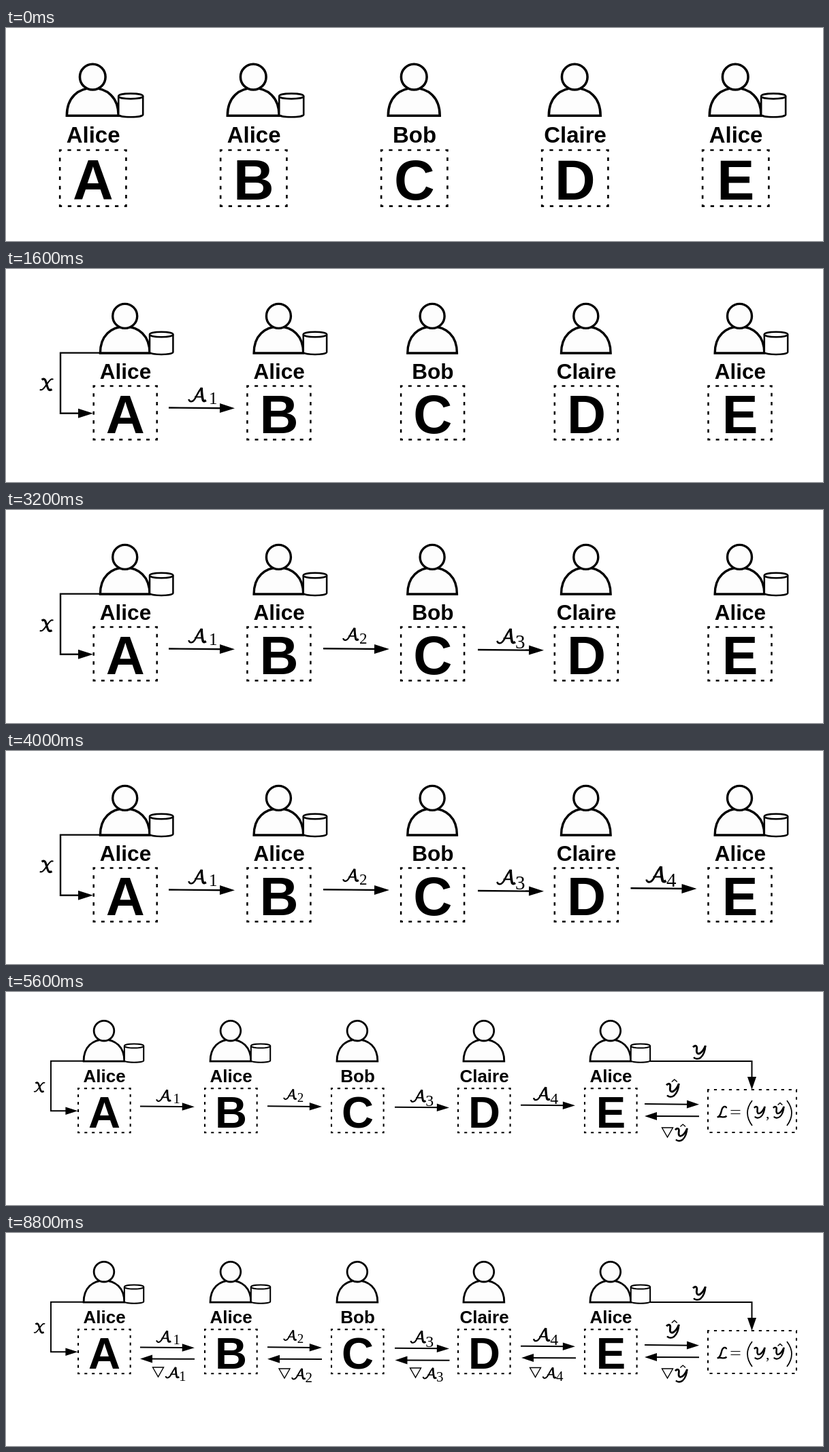
Animation, 1200 px wide and 314 px high, one loop 9.6 s. Source, as an HTML page:

```html
<!DOCTYPE html>
<html lang="en">
<head>
<meta charset="utf-8">
<title>Forward and backward pass</title>
<style>
  html, body { margin: 0; width: 100%; height: 100%; overflow: hidden; background: #fff; }
  svg { display: block; width: 100vw; height: 100vh; }
  text { font-family: "Liberation Sans", Arial, sans-serif; font-weight: bold; text-anchor: middle; }
  .math { font-family: "Liberation Serif", "Times New Roman", serif; font-weight: normal; text-anchor: start; }
  .line { fill: none; stroke: #000; }
</style>
</head>
<body>
<svg id="stage" viewBox="0 0 1200 314">
  <defs><clipPath id="lowEdge"><rect y="248.5" width="1200" height="10"/></clipPath></defs>
  <g id="scene"></g>
</svg>
<script>
const STEP = 800, STEPS = 12;
const people = ["Alice", "Alice", "Bob", "Claire", "Alice"];
const centre = i => 174.7 + 225.7 * i;

const path = (d, width) => `<path class="line" d="${d}" stroke-width="${width}"/>`;
const at = (x, y, scale, body) => `<g transform="translate(${x} ${y}) scale(${scale})">${body}</g>`;
const math = (x, y, size, s) => `<text class="math" x="${x}" y="${y}" font-size="${size}">${s}</text>`;

// Script capitals, 100 units tall from the top edge
const script = {
  A: path("M6 82C12 104 34 102 50 74C62 52 76 22 92 5", 11) +
     path("M92 4C93 40 96 70 102 90Q108 98 122 89", 16) + path("M46 66H98", 9),
  X: path("M18 16C40 0 46 20 54 50C62 84 70 102 92 87", 16) +
     path("M102 14C84 2 70 30 54 50C36 76 20 100 4 88", 10),
  Y: path("M5 16C22 -2 36 6 31 32C27 58 38 68 56 57C72 47 84 26 92 6", 14) +
     path("M92 4C90 38 78 72 58 89C42 102 20 100 10 87", 12),
  L: path("M84 18C82 -4 56 2 47 28C40 56 36 84 10 92C36 76 58 106 86 82", 13)
};
const glyph = (name, x, y, size) => at(x, y, size / 100, script[name]);
const hatY = (x, y, size) => glyph("Y", x, y, size) +
  path(`M${x + size * .42} ${y - 1.5}l${size * .19} ${-size * .17}l${size * .19} ${size * .17}`, 1.4);
const nabla = (x, y, size) => path(`M${x} ${y}h${size}l${-size / 2} ${size * .88}z`, 1.4);

function arrow(points, length, half, width) {
  const [[px, py], [x, y]] = points.slice(-2);
  const angle = Math.atan2(y - py, x - px);
  const stop = [x - Math.cos(angle) * length / 2, y - Math.sin(angle) * length / 2];
  return path("M" + [...points.slice(0, -1), stop].join("L"), width) +
    `<path d="M0 0L${-length} ${-half}V${half}z" transform="translate(${x} ${y}) rotate(${angle * 180 / Math.PI})"/>`;
}

const dashedBox = (x, y, w, h, scale = 1) =>
  `<rect class="line" x="${x}" y="${y}" width="${w}" height="${h}" stroke-width="${2.5 * scale}"
    stroke-dasharray="${5 * scale} ${8.23 * scale}" stroke-dashoffset="${2.5 * scale}"/>`;
const boxes = () => people.map((_, i) => dashedBox(centre(i) - 46, 172.5, 93, 79)).join("");

const person = `<g fill="#fdfdfd" stroke="#000" stroke-width="3.4">
  <path d="M-36.3 124C-36.3 98 -20 85 0 85S36.3 98 36.3 124z"/><circle cy="69.4" r="18"/></g>`;
const cylinder = `<g fill="#fff" stroke="#000" stroke-width="2.5">
  <path d="M36.3 96.5V122.5A17.2 3.4 0 0 0 70.7 122.5V96.5"/><ellipse cx="53.5" cy="96.5" rx="17.2" ry="3.7"/></g>`;

const actors = () => boxes() + people.map((name, i) => at(centre(i), 0, 1,
  person + (name === "Alice" ? cylinder : "") +
  `<text x=".8" y="162" font-size="31.5">${name}</text>
   <text x=".6" y="242.3" font-size="79">${"ABCDE"[i]}</text>`)).join("");

const input = () => arrow([[138, 123.6], [80, 123.6], [80, 212.7], [128, 212.7]], 22, 7, 2.4) +
  glyph("X", 49, 160, 20);

// Arrow start, arrow height, label x, label top, label size, digit x, digit baseline, digit size
const forward = [
  [239, 204.5, 267, 174, 22, 298, 199, 25],
  [466, 204.3, 494, 173, 19.5, 519, 197, 23],
  [693, 206, 720, 174, 23, 748, 204, 29],
  [917.5, 202.3, 939, 169, 25, 970, 200, 29]
];
const forwardArrow = ([x, y, lx, ly, size, dx, dy, digit], i) =>
  arrow([[x, y], [x + 97, y + .8]], 22, 7, 2.4) + glyph("A", lx, ly, size) + math(dx, dy, digit, i + 1);

// Arrow tip, arrow height, nabla x, nabla top
const backward = [
  [197, 185.5, 215.5, 198],
  [384, 185.7, 401, 200],
  [571.5, 187.5, 593.5, 199],
  [757, 184, 769.5, 198.5]
];
const backArrow = (x, y) => arrow([[x + 80, y + .3], [x, y]], 18, 6, 2);
const backwardArrow = ([x, y, lx, ly], i) => backArrow(x, y) + nabla(lx, ly, 16) +
  glyph("A", lx + 18, ly - 1, 17) + math(lx + 38.5, ly + 19.5, 21, i + 1);

const loss = () =>
  arrow([[946, 102], [1095.5, 102], [1095.5, 144]], 19, 6.5, 2) + glyph("Y", 1008, 78, 21) +
  arrow([[938, 165], [1018, 165.8]], 18, 6, 2) + hatY(969, 134, 21) +
  dashedBox(1031, 144, 130, 63, .83) + glyph("L", 1043, 168, 18) +
  path("M1064.5 174.5h14M1064.5 179.5h14", 1.2) +
  path("M1096 160Q1082 178 1096 197M1147 160Q1161 178 1147 197", 1.7) +
  glyph("Y", 1098, 168, 18) + math(1116, 186, 22, ",") + hatY(1126, 168, 18);

function draw(step) {
  const layout = actors() + (step ? input() : "") +
    forward.slice(0, Math.max(0, step - 1)).map(forwardArrow).join("");
  if (step === 0) return at(-55.4, -.4, 1.0456, layout);
  if (step < 6) return layout;
  return at(0, 0, .824, layout) + loss() +
    (step === 6 ? `<g clip-path="url(#lowEdge)">${boxes()}</g>` : "") +
    (step > 6 ? backArrow(938, 183) + nabla(963.5, 200, 16) + hatY(982, 200, 20) : "") +
    backward.map((b, i) => step >= 11 - i ? backwardArrow(b, i) : "").join("");
}

const scene = document.getElementById("scene");
let shown = -1;
function tick() {
  const step = Math.floor(performance.now() / STEP) % STEPS;
  if (step !== shown) scene.innerHTML = draw(shown = step);
  requestAnimationFrame(tick);
}
tick();
</script>
</body>
</html>
```
